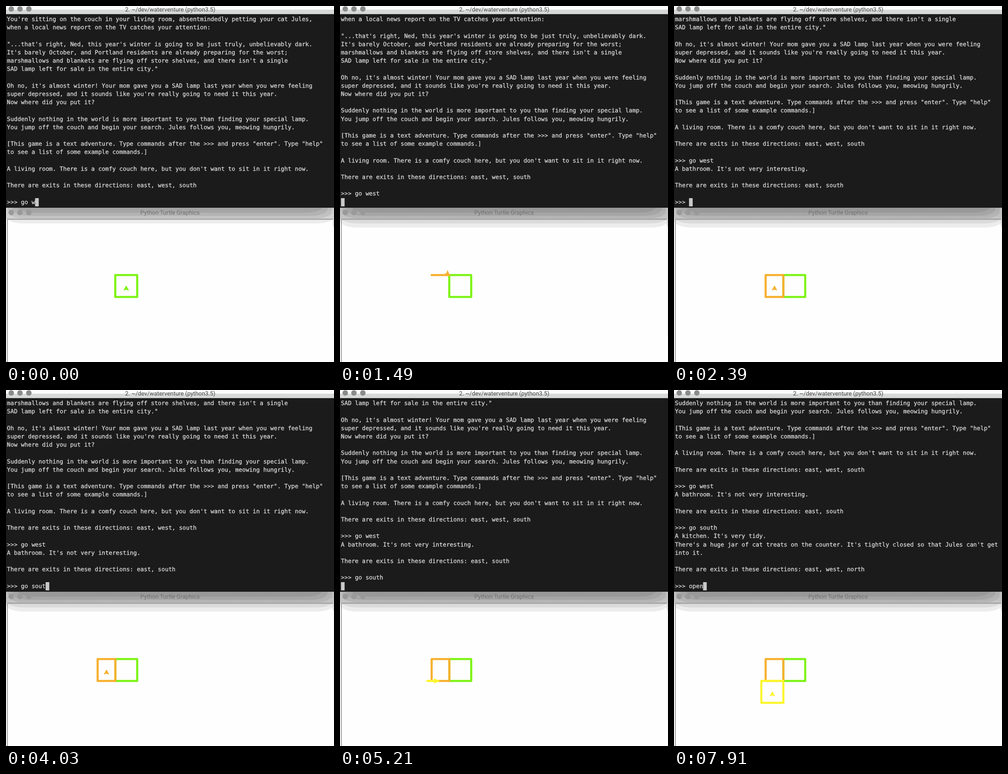
An HTML page that plays this animation: 718x780 px, repeating every 8 s.

```html
<!DOCTYPE html>
<html lang="en">
<head>
<meta charset="utf-8">
<title>Text adventure with map</title>
<style>
  html, body { margin: 0; width: 100%; height: 100%; overflow: hidden; background: #fff; }
  svg { display: block; width: 718px; height: 780px; }
  text { text-rendering: geometricPrecision; }
  .term { font: 12.78px "DejaVu Sans Mono", monospace; fill: #dcdcdc; stroke: #dcdcdc; stroke-width: .3; }
  .title { font: 12.9px Roboto, Arial, sans-serif; text-anchor: middle; }
  .room { fill: none; stroke-width: 4.6; stroke-linecap: round; stroke-linejoin: round; }
</style>
</head>
<body>
<svg viewBox="0 0 718 780">
  <defs>
    <linearGradient id="bar" x1="0" y1="0" x2="0" y2="1">
      <stop offset="0" stop-color="#d8d8d8"/>
      <stop offset="1" stop-color="#e4e4e4"/>
    </linearGradient>
  </defs>

  <rect width="718" height="780" fill="#fefefe"/>
  <rect y="442" width="718" height="24" fill="url(#bar)"/>
  <g id="shadow" fill="#000" fill-opacity=".07"></g>
  <path d="M0 466H718" stroke="#a9a9a9"/>
  <path d="M3 780V467.5H716" fill="none" stroke="#8e8e8e" stroke-width="1.6"/>
  <path d="M716.5 468V483" stroke="#b5b5b5"/>
  <path d="M716.5 483V724" stroke="#ececec"/>
  <g id="lowDots" fill="#999"></g>
  <text class="title" x="359" y="457" fill="#707070">Python Turtle Graphics</text>

  <g id="map"></g>
  <path id="turtle" d="M0 0L5 9L0 7L-5 9Z" stroke-width="1.4" stroke-linejoin="round"/>

  <rect y="17.5" width="718" height="424.5" fill="#1b1b1b"/>
  <rect width="718" height="8" fill="#fbfbfb"/>
  <rect y="8" width="718" height="9.5" fill="#d7d9d8"/>
  <g id="topDots" fill="#8b8b8b"></g>
  <text class="title" x="359.5" y="11.5" fill="#444">2. ~/dev/waterventure (python3.5)</text>

  <rect id="cursor" y="421" width="8" height="18" fill="#c9c9c9"/>
  <g id="screen" class="term"></g>
</svg>
<script>
const LOOP = 8000, TICK = 149.2, ROWS = 23, PITCH = 18.2, LEFT = 2.1, ADVANCE = 7.694;
const DRAW_TICKS = 12;
const $ = id => document.getElementById(id);

function add(parent, tag, attrs) {
  const el = document.createElementNS("http://www.w3.org/2000/svg", tag);
  for (const key in attrs) el.setAttribute(key, attrs[key]);
  return parent.appendChild(el);
}

const intro = `You're sitting on the couch in your living room, absentmindedly petting your cat Jules,
when a local news report on the TV catches your attention:

"...that's right, Ned, this year's winter is going to be just truly, unbelievably dark.
It's barely October, and Portland residents are already preparing for the worst;
marshmallows and blankets are flying off store shelves, and there isn't a single
SAD lamp left for sale in the entire city."

Oh no, it's almost winter! Your mom gave you a SAD lamp last year when you were feeling
super depressed, and it sounds like you're really going to need it this year.
Now where did you put it?

Suddenly nothing in the world is more important to you than finding your special lamp.
You jump off the couch and begin your search. Jules follows you, meowing hungrily.

[This game is a text adventure. Type commands after the >>> and press "enter". Type "help"
to see a list of some example commands.]

A living room. There is a comfy couch here, but you don't want to sit in it right now.

There are exits in these directions: east, west, south

`;

// keys: [tick, characters typed so far]; enter: tick at which the command is sent
const commands = [
  { text: "go west", keys: [[0, 4], [1, 5], [2, 6], [3, 7]], enter: 4,
    reply: `A bathroom. It's not very interesting.

There are exits in these directions: east, south

` },
  { text: "go south", keys: [[24, 1], [25, 3], [26, 5], [27, 7], [28, 8]], enter: 29,
    reply: `A kitchen. It's very tidy.
There's a huge jar of cat treats on the counter. It's tightly closed so that Jules can't get
into it.

There are exits in these directions: east, west, north

` },
  { text: "open", keys: [[50, 1], [52, 3], [53, 4]], enter: Infinity }
];

// swing: how far the turtle has turned when it is seen at a corner, in degrees
const rooms = [
  { x: 239.2, y: 589.5, w: 48, h: 48, color: "#7df313", start: -DRAW_TICKS, swing: 45 },
  { x: 200.6, y: 589.5, w: 38.8, h: 48, color: "#f7b02f", start: commands[0].enter, swing: 38 },
  { x: 191.2, y: 637.4, w: 48.2, h: 48, color: "#fdf62f", start: commands[1].enter, swing: 53 }
];

function transcript(tick) {
  let out = intro;
  for (const c of commands) {
    const typed = c.keys.reduce((n, [at, count]) => tick >= at ? count : n, 0);
    out += ">>> " + c.text.slice(0, typed);
    if (tick < c.enter) break;
    out += "\n";
    if (tick < c.enter + DRAW_TICKS) break;
    out += c.reply;
  }
  return out.split("\n").slice(-ROWS);
}

const center = r => [r.x + r.w / 2, r.y + r.h / 2];
const mix = (a, b, u) => a.map((v, i) => v + (b[i] - v) * u);

function corners(r) {
  const right = r.x + r.w, bottom = r.y + r.h;
  return [[r.x, r.y], [right, r.y], [right, bottom], [r.x, bottom], [r.x, r.y]];
}

// Walk to the room's centre, then to its corner, then clockwise around the walls.
function pose(room, previous, step) {
  const path = corners(room), middle = center(room);
  if (step >= DRAW_TICKS) return { at: middle, turn: 0, trail: path };
  if (step <= 2) return { at: mix(center(previous), middle, step / 2), turn: 0, trail: [] };
  if (step <= 4) return { at: mix(middle, path[0], (step - 2) / 2), turn: 0, trail: [] };
  const side = (step - 4) / 2, whole = Math.floor(side);
  const at = mix(path[whole], path[whole + 1], side - whole);
  const turn = 90 * Math.ceil(side) + (side === whole ? room.swing : 0);
  return { at, turn, trail: [...path.slice(0, whole + 1), at] };
}

for (const [id, y] of [["topDots", 6.5], ["lowDots", 452.5]])
  for (const cx of [11.5, 30.5, 50]) add($(id), "circle", { cx, cy: y, r: 6 });

const bands = [[485.5, 0], [476.5, 0], [466, 5], [460, 14], [453, 24]].map(([bottom, inset]) =>
  add($("shadow"), "path", {
    d: `M${inset} 442H${718 - inset}V${bottom - 13}Q${710 - inset} ${bottom} ${676 - inset} ${bottom}` +
       `H${42 + inset}Q${8 + inset} ${bottom} ${inset} ${bottom - 13}Z`
  }));

const rows = Array.from({ length: ROWS }, (_, i) =>
  add($("screen"), "text", { x: LEFT, y: 33.2 + i * PITCH }));
const walls = rooms.map(r => add($("map"), "polyline", { class: "room", stroke: r.color }));

function render(time) {
  const tick = Math.floor((time + 10) / TICK);

  const lines = transcript(tick);
  rows.forEach((row, i) => {
    if (row.textContent !== lines[i]) row.textContent = lines[i];
  });
  $("cursor").setAttribute("x", LEFT + lines[ROWS - 1].length * ADVANCE);

  // The window shadow widens once the first command is sent.
  bands[0].setAttribute("visibility", tick < commands[0].enter ? "hidden" : "visible");

  rooms.forEach((room, i) => {
    const step = tick - room.start;
    // The pen changes colour on the first step after the command is sent.
    if (step < 1) return walls[i].setAttribute("points", "");
    const { at, turn, trail } = pose(room, rooms[i - 1], step);
    walls[i].setAttribute("points", trail.join(" "));
    const turtle = $("turtle");
    turtle.setAttribute("transform", `translate(${at}) rotate(${turn})`);
    turtle.setAttribute("fill", room.color);
    turtle.setAttribute("stroke", room.color);
  });
}

const began = performance.now();
function frame() {
  render((performance.now() - began) % LOOP);
  requestAnimationFrame(frame);
}
frame();
</script>
</body>
</html>
```
